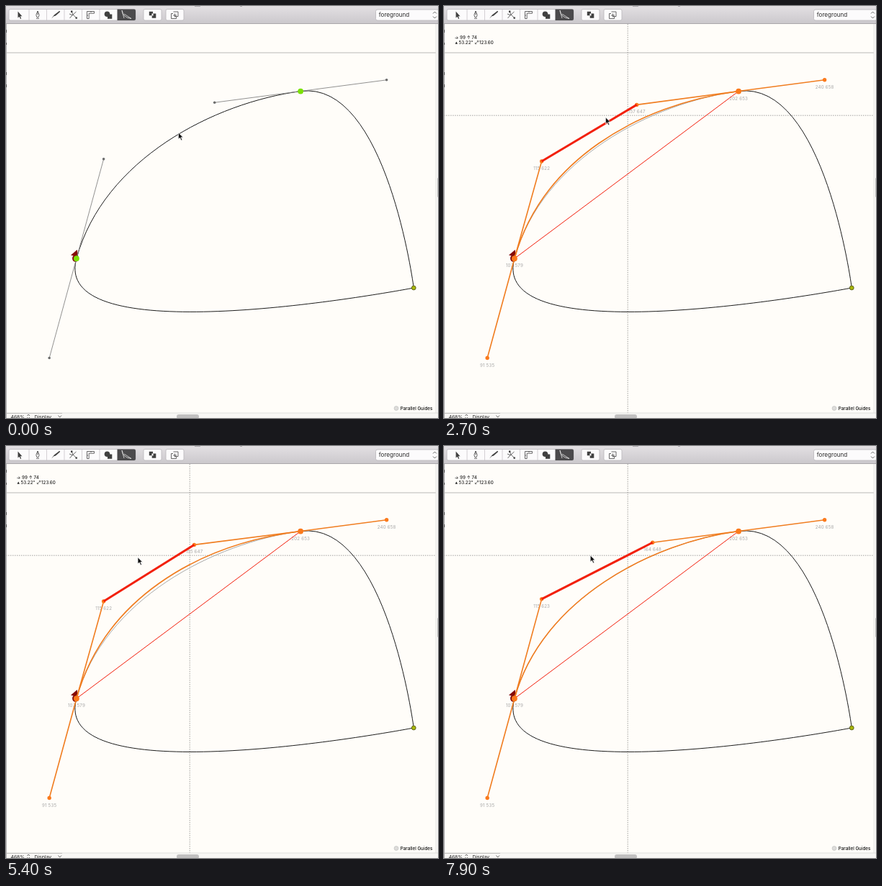
Recreate the animation shown at these times as an HTML page. Size 600 by 573 pixels, loop 8000 ms.

```html
<!DOCTYPE html>
<html lang="en">
<head>
<meta charset="utf-8">
<title>Curve segment editing</title>
<style>
  html, body { margin: 0; width: 100%; height: 100%; overflow: hidden; background: #fffdf9; }
  svg { display: block; width: 100vw; height: 100vh; font-family: Inter, "Open Sans", sans-serif; }
  .line { fill: none; }
  .outline { fill: none; stroke: #1c1c1c; stroke-width: 1; }
  .icon { fill: none; stroke: #444; stroke-width: .8; }
  .solid { fill: #404040; stroke: none; }
  .button { fill: #fcfbfc; stroke: #b9b6ba; stroke-width: .8; }
  .guide { fill: none; stroke: #8c8c8c; stroke-width: .8; stroke-dasharray: 1.5 1.5; }
  .label { font-size: 6.2px; fill: #a8a8a8; text-anchor: middle; letter-spacing: .15px; }
  .info { font-size: 6.2px; font-weight: 500; fill: #222; }
</style>
</head>
<body>
<svg viewBox="0 0 600 573" preserveAspectRatio="none">
  <defs>
    <linearGradient id="bar" x2="0" y2="1">
      <stop offset="0" stop-color="#e3e0e3"/>
      <stop offset="1" stop-color="#cbc8cc"/>
    </linearGradient>
  </defs>
  <rect width="600" height="573" fill="#fffdf9"/>
  <path d="M0 65H597" stroke="#b9b9b7"/>

  <!-- Drawing -->
  <g id="dragInfo">
    <path class="guide" d="M0 152.2H597M255.2 25V566"/>
    <text class="info" x="14.5" y="45.7">→ 99 ↑ 74</text>
    <path d="M15.5 52.7L17.2 49.5L18.9 52.7Z" fill="#222"/>
    <text class="info" x="20.5" y="53.2">53.22°</text>
    <path d="M43.5 52.5L47.5 48.7M43.3 50.8V52.7H45.2M45.8 48.5H47.7V50.4" fill="none" stroke="#222" stroke-width=".6"/>
    <text class="info" x="49" y="53.2">123.60</text>
  </g>
  <g id="labels"></g>
  <path d="M90 346.5L98.8 339L100.4 349Z" fill="#850b08"/>
  <ellipse cx="96.4" cy="351" rx="4.3" ry="5" fill="#850b08"/>
  <path class="outline" id="rest"/>
  <path class="line" id="before"/>
  <path class="line" id="chord" stroke-width="1"/>
  <path class="line" id="arms"/>
  <path class="line" id="after" stroke="#f07d20" stroke-width="1.6"/>
  <g id="dots"></g>
  <path class="line" id="bridge" stroke-width="3"/>
  <circle cx="566.3" cy="392" r="2.9" fill="#a8b70a" stroke="#55591c" stroke-width=".9"/>

  <!-- Window -->
  <rect width="600" height="24.5" fill="url(#bar)"/>
  <path d="M0 24.5H600" stroke="#aaa7ab"/>
  <path d="M262 0H270M325 0H328" stroke="#77747a"/>
  <path d="M.5 25V573" stroke="#b3b1b2"/>
  <path d="M.5 33V37M.5 51V54M.5 92V96M.5 109V113" stroke="#555"/>
  <rect x="597" y="25" width="3" height="541" fill="#f8f7f5"/>
  <path d="M597 25V566" stroke="#dedddb" stroke-width=".7"/>
  <rect x="599.2" y="239" width="3" height="27" rx="1.5" fill="#b4b4b4"/>
  <rect x="1" y="566" width="599" height="7" fill="#f8f7f5"/>
  <path d="M1 566H600" stroke="#d9d8d6" stroke-width=".8"/>
  <path d="M1 566.5H78" stroke="#b5b4b3" stroke-width=".8"/>
  <rect x="237" y="568" width="31" height="6" rx="3" fill="#c1c0c0"/>
  <g font-size="6.8" fill="#222">
    <text x="6.5" y="573.8">468%</text>
    <text x="39.5" y="573.8">Display</text>
  </g>
  <path class="icon" d="M29.5 570L31.2 568L33 570M29.5 572L31.2 574L33 572M72.5 569.5L74.7 572L77 569.5"/>
  <circle cx="542" cy="559.5" r="2.9" fill="#dddcda" stroke="#bbb" stroke-width=".6"/>
  <text x="547.7" y="562" font-size="6.3" font-weight="500" fill="#111">Parallel Guides</text>

  <!-- Toolbar -->
  <rect class="button" x="4" y="4.5" width="176" height="15.5" rx="2"/>
  <path d="M32 5V20M56.5 5V20M81 5V20M105.5 5V20M130 5V20" stroke="#c9c6ca" stroke-width=".8"/>
  <path d="M154.5 4.5H178Q180 4.5 180 6.5V18Q180 20 178 20H154.5Z" fill="#4b4a4c"/>
  <rect class="button" x="191" y="4.5" width="25" height="15.5" rx="2"/>
  <rect class="button" x="222" y="4.5" width="25" height="15.5" rx="2"/>
  <path class="solid" d="M16.5 7.5V16.5L18.5 14.7L20 18L21.2 17.4L19.8 14.2H22.4Z"/>
  <path class="icon" d="M44 7V12.5M44 7L41.8 12.5L42.9 15.5H45.1L46.2 12.5ZM42 17.3H46"/>
  <path class="solid" d="M74.3 6.8L75.2 7.9L69 13.4L66.4 14.2L63 17.8L66.8 12.4Z"/>
  <path class="icon" d="M88.5 17L92 13L97.5 8M91.2 7.5L93 12L97.7 16.5M88 11L92 12.5"/>
  <path class="solid" d="M90 6.5h2.4v2.4h-2.4ZM96.5 15.4h2.4v2.4h-2.4Z"/>
  <path class="icon" d="M112.5 17.5V7.5H122.5V10.2H115.2V17.5ZM118 7.5V9M112.5 13H114"/>
  <circle class="solid" cx="140.5" cy="11.3" r="3.8"/>
  <rect class="solid" x="141" y="11.5" width="6.3" height="6.3"/>
  <path class="line" d="M161 6Q162 16 174 17.5M161 6L164 17M164 11L174 17.5" stroke="#e8e8e8" stroke-width=".8"/>
  <path class="solid" d="M198.8 7.8H204V10.5H208.3V16.8H202.7V13.3H198.8Z"/>
  <path d="M202.5 10.5H204.5V13.5H202.5Z" fill="#fff"/>
  <path class="icon" d="M232.5 8H239V14.5H235M232 10.5H229.5V17.5H236.5V15M232 13H237M234.5 10.5V15.5"/>
  <rect class="button" x="513.5" y="5" width="88" height="15" rx="2.5"/>
  <text x="517.8" y="15.1" font-size="8.1" fill="#2c2c2c">foreground</text>
  <path class="icon" d="M593 10.5L595.5 8L598 10.5M593 14.5L595.5 17L598 14.5"/>

  <path id="cursor" d="M0 0V9.2L2.2 7.3L3.9 11L5.5 10.2L3.8 6.8H6.7Z" fill="#111" stroke="#fff" stroke-width=".7"/>
</svg>
<script>
  const LOOP = 8000, STEP = 100, DRAG_START = 600;
  const START = [103, 579], END = [202, 653], LOW = [91, 535], HIGH = [240, 658];
  const CORNER = "566.3 392";
  const $ = id => document.getElementById(id);

  // [time, x of the upper handle in font units]
  const reachKeys = [[0, 164], [600, 164], [1900, 167], [3500, 147], [4900, 166],
                     [6000, 141], [7100, 108], [7900, 164]];
  // [time, x, y]
  const cursorKeys = [[0, 239.4, 176], [600, 239.4, 174], [1900, 237.4, 150], [3500, 211.4, 159.5],
                      [4900, 182.6, 150], [6000, 183.6, 161], [7100, 201.4, 178], [7900, 203.2, 152]];

  function sample(keys, time) {
    const i = keys.findIndex(k => k[0] > time);
    if (i < 0) return keys[keys.length - 1].slice(1);
    const [a, b] = [keys[i - 1], keys[i]];
    const f = (1 - Math.cos(Math.PI * (time - a[0]) / (b[0] - a[0]))) / 2;
    return a.slice(1).map((v, j) => v + (b[j + 1] - v) * f);
  }

  // Font units to stage pixels
  const px = ([x, y]) => [97.9 + (x - 103) * 3.144, 351.2 - (y - 579) * 3.144];
  const at = p => px(p).map(v => v.toFixed(2)).join(" ");
  const lines = (...pairs) => pairs.map(([a, b]) => `M${at(a)}L${at(b)}`).join("");
  const curve = (h1, h2) => `M${at(START)}C${at(h1)} ${at(h2)} ${at(END)}`;

  // Both handles slide along their tangents and snap to whole units
  function handles(reach) {
    const rise = 44 - (164 - reach) * .125;
    return [
      [START[0] + rise * .27, START[1] + rise],
      [reach, END[1] - (END[0] - reach) * .131]
    ].map(p => p.map(Math.round));
  }

  const angle = (a, b) => Math.atan2(b[1] - a[1], b[0] - a[0]);
  const isParallel = (h1, h2) =>
    Math.abs(angle(h1, h2) - angle(START, END)) < Math.PI / 180;

  const home = handles(164);
  $("rest").setAttribute("d",
    `M${at(END)}C${at(HIGH)} ${CORNER} ${CORNER}C${CORNER} ${at(LOW)} ${at(START)}`);
  $("before").setAttribute("d", curve(...home));
  $("chord").setAttribute("d", lines([START, END]));

  function dot(p, big, dragging) {
    const [x, y] = px(p);
    const r = big ? 3.9 : dragging ? 2.7 : 1.8;
    const fill = dragging ? "#fb7a1c" : big ? "#7be105" : "#6c6c6c";
    return `<circle cx="${x}" cy="${y}" r="${r}" fill="${fill}"/>`;
  }

  function label(p) {
    const [x, y] = px(p);
    return `<text class="label" x="${x}" y="${y + 12}">${p[0]} ${p[1]}</text>`;
  }

  function draw(time) {
    const dragging = time >= DRAG_START;
    const [h1, h2] = handles(sample(reachKeys, time)[0]);
    const color = isParallel(h1, h2) ? "#0a30f5" : "#f2200c";

    for (const id of ["dragInfo", "labels", "chord", "after", "bridge"])
      $(id).style.display = dragging ? "" : "none";
    $("before").setAttribute("stroke", dragging ? "#aaa" : "#1c1c1c");
    $("after").setAttribute("d", curve(h1, h2));
    $("arms").setAttribute("d", lines([LOW, START], [START, h1], [h2, END], [END, HIGH]));
    $("arms").setAttribute("stroke", dragging ? "#f07d20" : "#858585");
    $("arms").setAttribute("stroke-width", dragging ? 1.6 : .9);
    $("bridge").setAttribute("d", lines([h1, h2]));
    $("bridge").setAttribute("stroke", color);
    $("chord").setAttribute("stroke", color);
    $("labels").innerHTML = [START, END, LOW, HIGH, h1, h2].map(label).join("");
    $("dots").innerHTML =
      [LOW, HIGH, h1, h2].map(p => dot(p, false, dragging)).join("") +
      [START, END].map(p => dot(p, true, dragging)).join("");
    $("cursor").setAttribute("transform", `translate(${sample(cursorKeys, time).join(" ")})`);
  }

  const origin = performance.now();
  function tick() {
    const time = (performance.now() - origin) % LOOP;
    draw(Math.floor(time / STEP) * STEP);
    requestAnimationFrame(tick);
  }
  tick();
</script>
</body>
</html>
```
